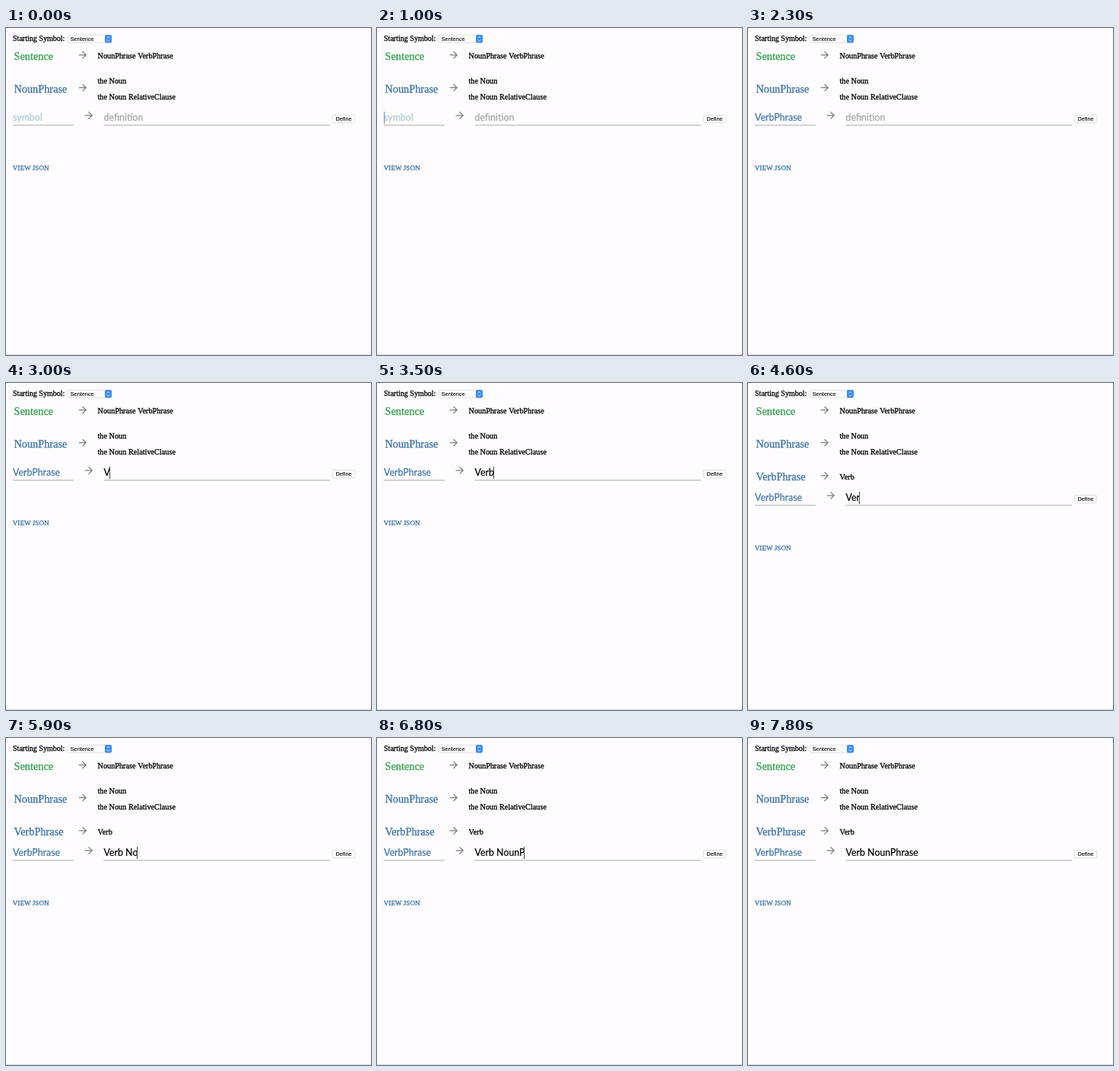
An HTML page with a canvas for the animation above (8 s loop, 480 px wide and 430 px high).

```html
<!DOCTYPE html>
<html lang="en">
<head>
<meta charset="utf-8">
<title>Grammar editor</title>
<style>
  html, body { margin: 0; width: 100%; height: 100%; overflow: hidden; background: #fefcff; }
  canvas { display: block; width: 480px; height: 430px; }
</style>
</head>
<body>
<canvas id="stage" width="480" height="430"></canvas>
<script>
const ctx = document.getElementById('stage').getContext('2d');
const LOOP = 8000;
const SERIF = '"Liberation Serif", serif';
const SANS = 'Lato, sans-serif';
const UI = '"Liberation Sans", sans-serif';
const BLUE = '#3c73a6', GREEN = '#35a04e', INK = '#000', GRAY = '#777';
const INPUT_SIZE = 12.4;
const SYMBOL_X = 9, DEFINITION_X = 128.5;

// Each entry is the state from that time on: [ms, definition, caret field]
const steps = [
  [0, '', ''], [1000, '', 'symbol'], [1800, '', 'definition'],
  [2300, '', ''], [2800, '', 'definition'],
  [3000, 'V', 'definition'], [3200, 'Ve', 'definition'],
  [3300, 'Ver', 'definition'], [3500, 'Verb', 'definition'],
  [3800, '', 'definition'], [4300, 'V', 'definition'],
  [4600, 'Ver', 'definition'], [4900, 'Verb', 'definition'],
  [5000, 'Verb ', 'definition'], [5500, 'Verb ', ''],
  [5600, 'Verb N', 'definition'], [5900, 'Verb No', 'definition'],
  [6000, 'Verb Nou', 'definition'], [6400, 'Verb Noun', 'definition'],
  [6800, 'Verb NounP', 'definition'], [7000, 'Verb NounPh', 'definition'],
  [7100, 'Verb NounPhra', 'definition'], [7200, 'Verb NounPhrase', 'definition'],
  [7700, 'Verb NounPhrase', '']
];

function text(str, x, y, size, color, family = SERIF, weight = 0.3) {
  ctx.font = `${size}px ${family}`;
  ctx.fillStyle = color;
  ctx.fillText(str, x, y);
  ctx.strokeStyle = color;
  ctx.lineWidth = weight;
  ctx.strokeText(str, x, y);
}

function path(points, color, width) {
  ctx.beginPath();
  points.forEach(([x, y]) => ctx.lineTo(x, y));
  ctx.strokeStyle = color;
  ctx.lineWidth = width;
  ctx.stroke();
}

function arrow(x, y) {
  path([[x, y], [x + 9.5, y]], GRAY, 1.2);
  path([[x + 4.8, y - 4.7], [x + 9.5, y], [x + 4.8, y + 4.7]], GRAY, 1.2);
}

function box(x, y, w, h, fill, stroke) {
  ctx.beginPath();
  ctx.roundRect(x, y, w, h, 2);
  ctx.fillStyle = fill;
  ctx.fill();
  if (stroke) {
    ctx.strokeStyle = stroke;
    ctx.lineWidth = 0.7;
    ctx.stroke();
  }
}

function rule(symbol, color, y, definitions) {
  text(symbol, 10.5, y, 14.3, color);
  arrow(95.7, y - 6.3);
  definitions.forEach(([str, lineY]) => text(str, 120.5, lineY, 10.25, INK));
}

function selectBox() {
  box(81, 9.3, 57.5, 10, '#fff', '#d2d1d5');
  text('Sentence', 84.7, 17, 7.3, INK, UI, 0.1);
  box(130, 9, 9, 10.6, '#3b8cf3');
  path([[132.8, 13.1], [134.5, 11.3], [136.2, 13.1]], '#fff', 0.9);
  path([[132.8, 15.5], [134.5, 17.3], [136.2, 15.5]], '#fff', 0.9);
}

function input(x, right, value, placeholder, color, hint, caret) {
  text(value || placeholder, x, 122.4, INPUT_SIZE, value ? color : hint, SANS, 0.2);
  path([[x, 127.9], [right, 127.9]], '#aaa', 1);
  if (caret) {
    const end = Math.floor(x + (value ? ctx.measureText(value).width - 0.7 : 0));
    ctx.fillStyle = color === INK ? '#444' : '#7590a8';
    ctx.fillRect(end, 110, 1, 16);
  }
}

function form(symbol, definition, caret) {
  input(SYMBOL_X, 89, symbol, 'symbol', BLUE, '#adc7d6', caret === 'symbol');
  arrow(103.7, 115);
  input(DEFINITION_X, 426, definition, 'definition', INK, '#a0a3a0', caret === 'definition');
  box(429.3, 114.5, 29.5, 10.3, '#fff', '#d2d1d5');
  text('Define', 433.5, 122.3, 7.3, INK, UI, 0.1);
  text('VIEW JSON', 8.8, 187.2, 9.1, BLUE);
}

function draw(t) {
  const [, definition, caret] = steps.findLast(([start]) => t >= start);
  const symbol = t >= 1300 ? 'VerbPhrase' : '';
  const added = t >= 3800;

  ctx.fillStyle = '#fefcff';
  ctx.fillRect(0, 0, 480, 430);
  ctx.fillStyle = '#d8d7da';
  ctx.fillRect(0, 429, 480, 1);

  text('Starting Symbol:', 9, 17, 10.05, INK);
  selectBox();
  rule('Sentence', GREEN, 41.8, [['NounPhrase VerbPhrase', 40.3]]);
  rule('NounPhrase', BLUE, 84.8, [['the Noun', 73], ['the Noun RelativeClause', 94]]);
  if (added) rule('VerbPhrase', BLUE, 128.2, [['Verb', 126.8]]);

  ctx.save();
  ctx.translate(0, added ? 33 : 0);
  form(symbol, definition, caret);
  ctx.restore();
}

const begin = performance.now();
function tick() {
  draw((performance.now() - begin) % LOOP);
  requestAnimationFrame(tick);
}
tick();
</script>
</body>
</html>
```
